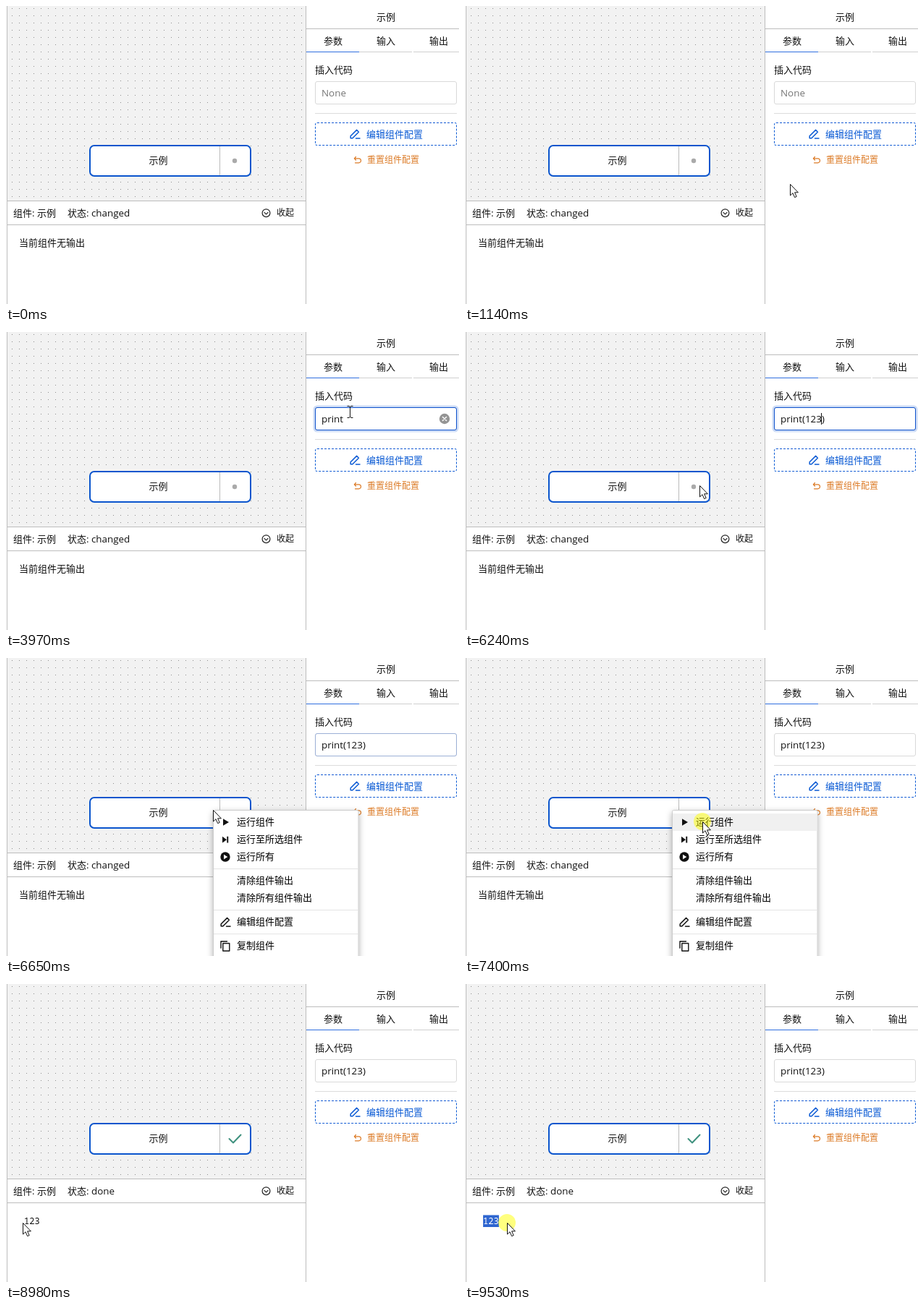
An HTML page for the animation above (9600 ms loop, 626 px wide and 412 px high).

```html
<!DOCTYPE html>
<html lang="zh-CN">
<head>
<meta charset="utf-8">
<title>示例</title>
<style>
html, body { margin: 0; width: 100%; height: 100%; overflow: hidden; background: #fff; }
svg { display: block; width: 626px; height: 412px; }
text { font: 13px "Noto Sans CJK SC", "Noto Sans CJK", sans-serif; fill: #111; }
.small { font-size: 12px; }
.latin { font: 13.4px "Open Sans", "Noto Sans", sans-serif; }
.mono { font: 12px "Noto Sans Mono", "DejaVu Sans Mono", monospace; }
.mid { text-anchor: middle; }
.line { fill: none; stroke-linecap: round; stroke-linejoin: round; }
.crisp { shape-rendering: crispEdges; }
.dashed { box-sizing: border-box; height: 32px; border: 1px dashed #0a5ad4; border-radius: 3px; }
#menu text { fill: #000; }
</style>
</head>
<body>
<svg viewBox="0 0 626 412">
  <defs>
    <pattern id="grid" width="10" height="10" patternUnits="userSpaceOnUse">
      <rect width="10" height="10" fill="#f2f2f2"/>
      <rect x="8" y="3" width="1" height="1" fill="#8c8c8c"/>
    </pattern>
    <filter id="shadow" x="-20%" y="-20%" width="140%" height="140%">
      <feDropShadow dx="0" dy="3" stdDeviation="4" flood-opacity=".32"/>
    </filter>
    <g id="pen" class="line" stroke="currentColor" stroke-width="1.5">
      <path d="M1.2 12.8V9.8L9.6 1.4L12.4 4.2L3.9 12.8ZM8.5 13.1H14"/>
    </g>
  </defs>

  <!-- canvas and output panel -->
  <g class="crisp">
    <rect width="626" height="412" fill="#fff"/>
    <rect x="2" width="412" height="269" fill="url(#grid)"/>
    <g fill="#bdbdbd">
      <rect x="1" width="1" height="412"/>
      <rect x="414" width="1" height="412"/>
      <rect x="2" y="269" width="412" height="1"/>
      <rect x="2" y="302" width="412" height="1"/>
      <rect x="415" y="31" width="211" height="1"/>
    </g>
    <path d="M488 63.5H561M563 63.5H626" stroke="#cfcfcf"/>
    <rect x="415" y="63" width="73" height="1" fill="#2f6fe0"/>
    <rect x="427" y="148" width="196" height="1" fill="#dcdcdc"/>
  </g>
  <text x="10" y="291">组件</text><text class="latin" x="36" y="291">:</text><text x="43" y="291">示例</text>
  <text x="85" y="291">状态</text><text class="latin" x="111" y="291">:</text>
  <text id="status" class="latin" x="118" y="291"></text>
  <g class="line" stroke="#222" stroke-width="1.2">
    <circle cx="359.5" cy="286.2" r="5.4"/>
    <path d="M357 285.3L359.5 287.8L362 285.3"/>
  </g>
  <text class="small" x="374" y="290">收起</text>
  <text id="empty" x="18" y="332">当前组件无输出</text>
  <g id="result">
    <text class="mono" x="25" y="332">123</text>
    <rect id="mark" x="25" y="319.5" height="16.5" fill="#2f66d0"/>
    <text id="marked" class="mono" x="25" y="332" style="fill:#fff"></text>
  </g>

  <!-- node -->
  <rect x="116" y="193" width="222" height="42" rx="6" fill="#fff" stroke="#0b55cd" stroke-width="2"/>
  <rect class="crisp" x="295" y="194" width="1" height="40" fill="#bbb"/>
  <text class="mid" x="210.5" y="218">示例</text>
  <circle id="idle" cx="316" cy="214" r="3.2" fill="#aaa"/>
  <path id="check" class="line" d="M308.5 214L314 219.5L324.5 208.5" stroke="#3f917e" stroke-width="2"/>
  <g id="handles" fill="#e6eaec" stroke="#c6ccd1" stroke-width="1.3"></g>

  <!-- settings -->
  <text class="mid" x="525" y="20">示例</text>
  <text class="mid" x="452" y="53">参数</text>
  <text class="mid" x="525" y="53">输入</text>
  <text class="mid" x="598" y="53">输出</text>
  <text x="427" y="93">插入代码</text>
  <rect id="glow" x="426" y="103" width="198" height="34" rx="4" fill="none" stroke="#1f5fd6" stroke-opacity=".22" stroke-width="3"/>
  <rect x="427.5" y="104.5" width="195" height="31" rx="2.5" fill="#fff" stroke="#d9d9d9"/>
  <rect id="focus" x="427.5" y="104.5" width="195" height="31" rx="2.5" fill="none" stroke="#0f52cc"/>
  <text id="field" class="latin" x="436" y="125"></text>
  <rect id="caret" class="crisp" y="112" width="1" height="16" fill="#111"/>
  <g id="clear">
    <circle cx="606" cy="120" r="7.2" fill="#949494"/>
    <path class="line" d="M603.4 117.4L608.6 122.6M608.6 117.4L603.4 122.6" stroke="#fff" stroke-width="1.4"/>
  </g>
  <foreignObject x="427" y="161" width="196" height="32"><div class="dashed"></div></foreignObject>
  <use href="#pen" x="475" y="170" color="#0a5ad4"/>
  <text x="498" y="182" style="fill:#0a5ad4">编辑组件配置</text>
  <path class="line" d="M483.5 208.5L481.3 210.8L483.5 213M481.5 210.8H487.5A3 3 0 0 1 487.5 216.8H482.5" stroke="#dc7b27" stroke-width="1.2"/>
  <text class="small" x="499" y="217" style="fill:#dc7b27">重置组件配置</text>

  <!-- context menu -->
  <g id="menu">
    <rect x="286.5" y="210.5" width="200.5" height="240" rx="2" fill="#fff" stroke="#ccc" filter="url(#shadow)"/>
    <rect id="hover" x="287" y="215" width="199.5" height="24" fill="#f0f0f0"/>
    <path d="M287 291.5H487M287 348.5H487M287 381.5H487" stroke="#e4e4e4"/>
    <path d="M300 222.3L308 227L300 231.7ZM299 246.8L305 251.2L299 255.6ZM305.3 246.8H307.2V255.6H305.3Z" fill="#111"/>
    <circle cx="303" cy="275" r="6.7" fill="#111"/>
    <path d="M301 271.7L306.3 275L301 278.3Z" fill="#fff"/>
    <use href="#pen" x="296" y="358" color="#111"/>
    <path class="line" d="M297 401V391.8H305.5M299.8 394.5H308.8V405H299.8Z" stroke="#111" stroke-width="1.4"/>
  </g>

  <!-- pointer -->
  <g id="pointer">
    <circle id="press" r="12" fill="#ff0" fill-opacity=".5"/>
    <path id="arrow" d="M.5 .5V16L4 12.7L6.6 18.6L9.2 17.5L6.6 11.8H11.4Z" fill="#fff" stroke="#111"/>
    <path id="beam" d="M-3.5 -7.5H-1L.5 -6.5L2 -7.5H4.5M.5 -6.5V7.5M-3.5 8.5H-1L.5 7.5L2 8.5H4.5" fill="none" stroke="#111"/>
    <g id="hand" class="line" stroke="#000" stroke-width="1.3">
      <path fill="#fff" d="M-3.5 9C-4.5 6 -7.3 3.5 -7.9 1.5C-8.2 -.3 -6 -.8 -4.7 1L-3.5 2L-5.4 -4C-5.8 -6.6 -3.4 -7.1 -2.8 -5L-2.4 -6.8C-2 -9 .7 -9 1 -7L1.4 -6.5C2.4 -8.7 5 -8 4.8 -5.8L5.4 -4.6C6.8 -6.4 9 -5.2 8.5 -3.2C7.3 0 7.4 4 5.2 6.5L5 9Z"/>
      <path d="M-2.8 -5L-1.7 -.5M1.1 -6.5V-.7M4.8 -5.8L3.8 -.3"/>
    </g>
  </g>
</svg>
<script>
const LOOP = 9600, TICK = 70, BLINK = 530;
const el = id => document.getElementById(id);
const show = (id, on) => el(id).setAttribute('visibility', on ? 'visible' : 'hidden');
const set = (id, name, value) => el(id).setAttribute(name, value);
const add = (parent, tag, attrs, label = '') => {
  const node = document.createElementNS('http://www.w3.org/2000/svg', tag);
  for (const key in attrs) node.setAttribute(key, attrs[key]);
  node.textContent = label;
  el(parent).append(node);
};

[[227, 194], [337, 214], [227, 234], [117, 214]].forEach(([cx, cy]) => add('handles', 'circle', { cx, cy, r: 4.3 }));
[['运行组件', 227], ['运行至所选组件', 251], ['运行所有', 275], ['清除组件输出', 308],
 ['清除所有组件输出', 332], ['编辑组件配置', 365], ['复制组件', 398]]
  .forEach(([label, y]) => add('menu', 'text', { x: 319, y: y + 4 }, label));

// Each edit: time, value, caret index
const edits = [
  [0, '', 0], [1430, '', 0], [2290, 'p', 1], [2490, 'pr', 2], [2760, 'pri', 3], [3090, 'prin', 4],
  [3420, 'print', 5], [4040, 'print(', 6], [4170, 'print()', 7], [4430, 'print()', 6],
  [5620, 'print(1)', 7], [5750, 'print(12)', 8], [5880, 'print(123)', 9]
];
// Each move: start, end, then cubic control points
const moves = [
  [660, 1360, [356, 393], [430, 340], [462, 230], [475, 110]],
  [5890, 6240, [475, 110], [450, 150], [380, 195], [324, 212]],
  [6240, 6450, [324, 212], [312, 213], [298, 211], [286, 210]],
  [6650, 7000, [286, 210], [298, 214], [316, 222], [328, 226]],
  [8280, 8980, [269, 254], [190, 330], [80, 385], [23, 330]],
  [9320, 9530, [23, 330], [34, 330], [46, 330], [58, 330]]
];
const presses = [[1430, 1620], [6580, 6650], [7400, 7470], [9120, LOOP]];
const handleSteps = [[0, 0], [6310, .5], [6380, 1], [6580, 0], [7470, 1], [8350, .5], [8420, 0]];
const focusSteps = [[0, 0], [1430, .4], [1490, .8], [1550, 1], [6580, .7], [6650, .3], [6720, .1], [6790, 0]];

const last = (table, t) => table.filter(row => row[0] <= t).pop();
const within = (t, a, b) => t >= a && t < b;

function locate(t) {
  const move = last(moves, t);
  if (!move) return null;
  const [start, end, ...points] = move;
  const p = Math.min(1, Math.floor((t - start) / TICK + 1e-6) * TICK / (end - start)), q = 1 - p;
  const weights = [q * q * q, 3 * q * q * p, 3 * q * p * p, p * p * p];
  return [0, 1].map(axis => weights.reduce((sum, w, i) => sum + w * points[i][axis], 0));
}

const pen = document.createElement('canvas').getContext('2d');
function widthOf(value) {
  pen.font = '13.4px "Open Sans", "Noto Sans", sans-serif';
  return pen.measureText(value).width;
}

function drawField(t, hovered) {
  const [since, value, index] = last(edits, t);
  el('field').textContent = value || 'None';
  el('field').style.fill = value ? '#111' : '#757575';
  const lit = Math.floor((t - since) / BLINK) % 2 === 0;
  show('caret', within(t, 1430, 6580) && lit);
  set('caret', 'x', Math.floor(436 + widthOf(value.slice(0, index))));
  show('clear', value && hovered);
  const focus = last(focusSteps, t)[1];
  set('focus', 'opacity', focus);
  set('glow', 'opacity', focus > .3 ? focus : 0);
}

function drawPointer(t, at, inField) {
  show('pointer', at);
  const pressed = presses.some(([a, b]) => within(t, a, b));
  let shape = 'arrow';
  if (at) {
    const [x, y] = at;
    set('pointer', 'transform', `translate(${Math.round(x)} ${Math.round(y)})`);
    const inNode = x > 115 && x < 339 && y > 192 && y < 236;
    if (inField) shape = 'beam';
    else if (x < 414 && y < 269 && !inNode) shape = 'hand';
  }
  for (const id of ['arrow', 'beam', 'hand']) show(id, at && id === shape);
  show('press', at && pressed);
}

function draw(t) {
  const at = locate(t);
  const inField = at && at[0] > 427 && at[0] < 623 && at[1] > 104 && at[1] < 136;
  drawField(t, inField);
  drawPointer(t, at, inField);

  const menu = within(t, 6650, 7470);
  show('menu', menu);
  show('hover', menu && t >= 6790);
  set('handles', 'opacity', last(handleSteps, t)[1]);

  const done = t >= 7600;
  el('status').textContent = done ? 'done' : 'changed';
  show('idle', !done);
  show('check', done);
  show('empty', !done);
  show('result', t >= 7730);

  const count = last([[0, 0], [9390, 1], [9460, 2], [9530, 3]], t)[1];
  show('mark', count);
  set('mark', 'width', count * 7.3);
  el('marked').textContent = '123'.slice(0, count);
}

const begin = performance.now();
function frame() {
  draw((performance.now() - begin) % LOOP);
  requestAnimationFrame(frame);
}
frame();
</script>
</body>
</html>
```
